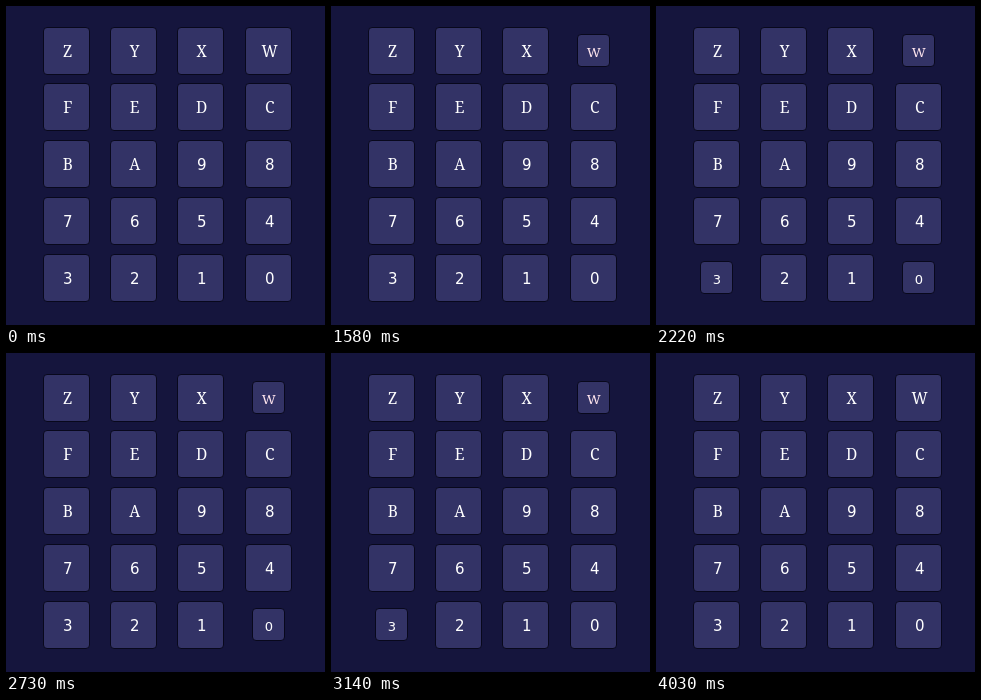
Write an HTML page with a canvas that moves like this. It is 319 px wide and 319 px high and loops after 4160 ms.

```html
<!DOCTYPE html>
<html lang="en">
<head>
<meta charset="utf-8">
<title>Keypad</title>
<style>
html, body { margin: 0; width: 100%; height: 100%; overflow: hidden; background: #15153d; }
canvas { display: block; width: 319px; height: 319px; }
</style>
</head>
<body>
<canvas id="pad" width="319" height="319"></canvas>
<script>
const ctx = document.getElementById('pad').getContext('2d');
const LOOP = 4160;
const COLS = [37, 104, 171, 239];
const ROWS = [21, 77, 134, 191, 248];
const LABELS = 'ZYXWFEDCBA9876543210';
const LETTERS = '"Noto Serif", "Liberation Serif", serif';
const DIGITS = '"DejaVu Sans", sans-serif';

// Time in ms and the keys held from then on
const STEPS = [
  [0, ''], [380, 'W'], [1020, 'W0'], [1300, 'W'], [1400, 'W3'],
  [1580, 'W'], [1660, 'W0'], [1730, 'W'], [1810, 'W3'], [1910, 'W'],
  [1980, 'W0'], [2040, 'W'], [2140, 'W3'], [2220, 'W30'], [2500, 'W'],
  [2730, 'W0'], [2780, 'W'], [2830, 'W3'], [2880, 'W'], [2960, 'W0'],
  [3050, 'W'], [3140, 'W3'], [3190, 'W30'], [3290, 'W0'], [3340, 'W'],
  [4030, '']
];

function heldAt(t) {
  let held = '';
  for (const [start, keys] of STEPS) if (t >= start) held = keys;
  return held;
}

function drawBox(x, y, w, h) {
  ctx.beginPath();
  ctx.roundRect(x + 0.5, y + 0.5, w, h, 3.5);
  ctx.fillStyle = '#333366';
  ctx.fill();
  ctx.strokeStyle = '#08081c';
  ctx.stroke();
}

function drawKey(label, x, y, down) {
  if (down) drawBox(x + 7, y + 7, 32, 32);
  else drawBox(x, y, 46, 47);
  const digit = label >= '0' && label <= '9';
  const size = (digit ? 15 : 15.5) * (down ? 0.87 : 1);
  ctx.font = `${size}px ${digit ? DIGITS : LETTERS}`;
  ctx.fillStyle = down && !digit ? '#ffe6ee' : '#ffffff';
  ctx.fillText(label, x + (down ? 23.8 : 24.7), y + 29.5);
}

function draw(t) {
  const held = heldAt(t);
  ctx.fillStyle = '#15153d';
  ctx.fillRect(0, 0, 319, 319);
  ctx.textAlign = 'center';
  ctx.textBaseline = 'alphabetic';
  [...LABELS].forEach((label, i) => {
    drawKey(label, COLS[i % 4], ROWS[Math.floor(i / 4)], held.includes(label));
  });
}

const begin = performance.now();
function tick() {
  draw((performance.now() - begin) % LOOP);
  requestAnimationFrame(tick);
}
tick();
</script>
</body>
</html>
```
